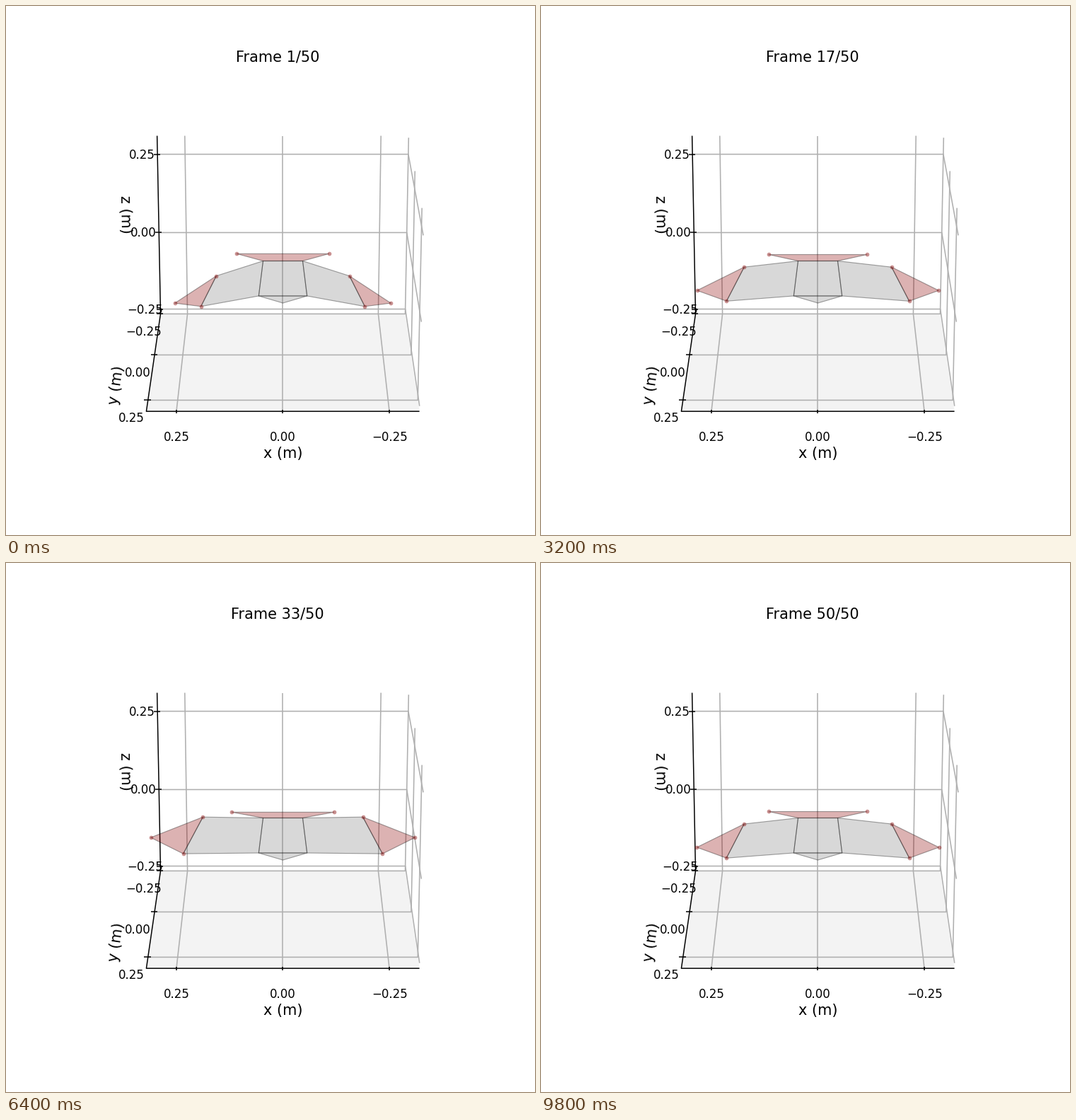
A matplotlib script for the animation above (10 s loop, 748 px wide and 748 px high).

```python
import math

import numpy as np
import matplotlib.pyplot as plt
from matplotlib.animation import FuncAnimation
from matplotlib.collections import LineCollection, PolyCollection

SIZE, DPI = 748, 100
FRAMES, INTERVAL = 50, 200
LAST_POSE = 42          # the wings rest after this step
CX = 391                # mirror axis
PX = 72 / DPI           # points per pixel
TICK_PX, BIG_PX = 16.67, 20.83

# Box limits in metres
SIDE, BACK, FRONT, FLOOR, TOP = 0.3206, -0.25, 0.308, -0.266, 0.308
WALL_TOP = 0.302
TICKS = (-0.25, 0, 0.25)

plt.rcParams["font.family"] = "DejaVu Sans"


def project(x, y, z):
    """Perspective view of a point in metres, in pixels."""
    w = 1 - 0.1982 * y - 0.0507 * z
    return CX - 573.6 * x / w, (373 + 149 * y - 475.7 * z) / w


def path(*points):
    return [project(*p) for p in points]


fig = plt.figure(figsize=(SIZE / DPI, SIZE / DPI), dpi=DPI, facecolor="white")
ax = fig.add_axes([0, 0, 1, 1])
ax.set_xlim(-0.5, SIZE - 0.5)
ax.set_ylim(SIZE - 0.5, -0.5)
ax.axis("off")


def lines(paths, color, width, z):
    ax.add_collection(LineCollection(paths, colors=color, zorder=z,
                                     linewidths=width * PX))


def label(x, y, text, px, **kw):
    kw = {"ha": "center", "va": "baseline", "zorder": 3, **kw}
    return ax.text(x, y, text, fontsize=px * PX, **kw)


def tick_label(x, y, value):
    label(x, y + 6, f"{value:.2f}".replace("-", "−"), TICK_PX)


# Floor, grid, ticks and tick labels
corners = path((SIDE, BACK, FLOOR), (-SIDE, BACK, FLOOR),
               (-SIDE, FRONT, FLOOR), (SIDE, FRONT, FLOOR))
ax.fill(*zip(*corners), color="#f3f3f3", lw=0, zorder=0)

grid, marks = [], []
for v in TICKS:
    grid += [
        path((v, BACK, TOP), (v, BACK, FLOOR), (v, FRONT, FLOOR)),
        path((SIDE, v, FLOOR), (-SIDE, v, FLOOR), (-SIDE, v, WALL_TOP)),
        path((SIDE, BACK, v), (-SIDE, BACK, v), (-SIDE, FRONT, v)),
    ]
    x, y = project(v, FRONT, FLOOR)
    marks.append([(x, y - 2), (x, y + 3.3)])
    tick_label(x + 0.2, y + 36, v)
    for (x, y), dx, dy in [(project(SIDE, BACK, v), -21.7, 0),
                           (project(SIDE, v, FLOOR), -23.7, 24.5)]:
        marks.append([(x - 5.5, y), (x + 3.8, y)])
        tick_label(x + dx, y + dy, v)

frame = path((SIDE, BACK, TOP), (SIDE, BACK, FLOOR),
             (SIDE, FRONT, FLOOR), (-SIDE, FRONT, FLOOR))
lines(grid, "#b0b0b0", 1.6, 1)
lines([frame] + marks, "black", 1.5, 2)

label(CX, 639, "x (m)", BIG_PX)
label(155.5, 536, "y (m)", BIG_PX, rotation=81.7, va="center")
label(168.5, 294, "z (m)", BIG_PX, rotation=-88.9, va="center")
title = label(383.3, 78.5, "", BIG_PX)

# Left half of the model: tip, wrist, leading edge and tail at three lifts
LOW = np.array([(251.3, 434), (304.2, 391), (284.8, 430), (329.3, 348.8)])
MID = np.array([(215.8, 397.8), (284.4, 365.9), (258.7, 415.1), (320.7, 351.2)])
HIGH = np.array([(180.2, 369.9), (264.7, 345.6), (232.6, 402.1), (315.8, 352.8)])
REAR, NECK, NOSE = (363, 360), (356.8, 409.5), (CX, 419.5)

# Turning points of the flap: step, lift, and easing bias of the next stroke
TURNS = [(-17, 1, 1.1), (6, 0, 1.1), (26.2, 1, 1.22), (38.3, 0.06, 1),
         (46.7, 1, 1)]


def lift(step):
    """Cosine strokes between the turning points."""
    for (t0, a, bias), (t1, b, _) in zip(TURNS, TURNS[1:]):
        if step <= t1:
            p = ((step - t0) / (t1 - t0)) ** bias
            return a + (b - a) * (1 - math.cos(math.pi * p)) / 2


def wing(step):
    u = lift(min(step, LAST_POSE))
    return ((1 - u) * (1 - 2 * u) * LOW + 4 * u * (1 - u) * MID
            + u * (2 * u - 1) * HIGH)


def mirror(points):
    return [(2 * CX - x, y) for x, y in points]


def shapes(step):
    """Polygons (grey first, then red) and marker positions."""
    left = wing(step)
    tip, wrist, lead, tail = left
    rear_r, neck_r, tail_r = mirror([REAR, NECK, tail])
    body = [REAR, rear_r, neck_r, NECK]
    nose = [NECK, neck_r, NOSE]
    inner = [REAR, wrist, lead, NECK]
    fan = [tail, tail_r, rear_r, REAR]
    outer = [wrist, tip, lead]
    polys = [body, nose, inner, mirror(inner), fan, outer, mirror(outer)]
    return polys, [*left, *mirror(left)]


GREY, RED = (0.5, 0.5, 0.5, 0.3), (0.545, 0, 0, 0.3)
surface = PolyCollection([], facecolors=[GREY] * 4 + [RED] * 3,
                         edgecolors=[(0, 0, 0, 0.35)], linewidths=1.15 * PX,
                         zorder=4)
ax.add_collection(surface)
dots = ax.scatter([], [], s=(5.7 * PX) ** 2, color=(0.545, 0.05, 0.05, 0.45),
                  linewidths=0, zorder=5)


def draw(step):
    polys, points = shapes(step)
    surface.set_verts([np.array(p, float) for p in polys])
    dots.set_offsets(np.array(points, float))
    title.set_text(f"Frame {step + 1}/{FRAMES}")
    return surface, dots, title


anim = FuncAnimation(fig, draw, frames=FRAMES, interval=INTERVAL, repeat=True,
                     repeat_delay=0)
plt.show()
```
